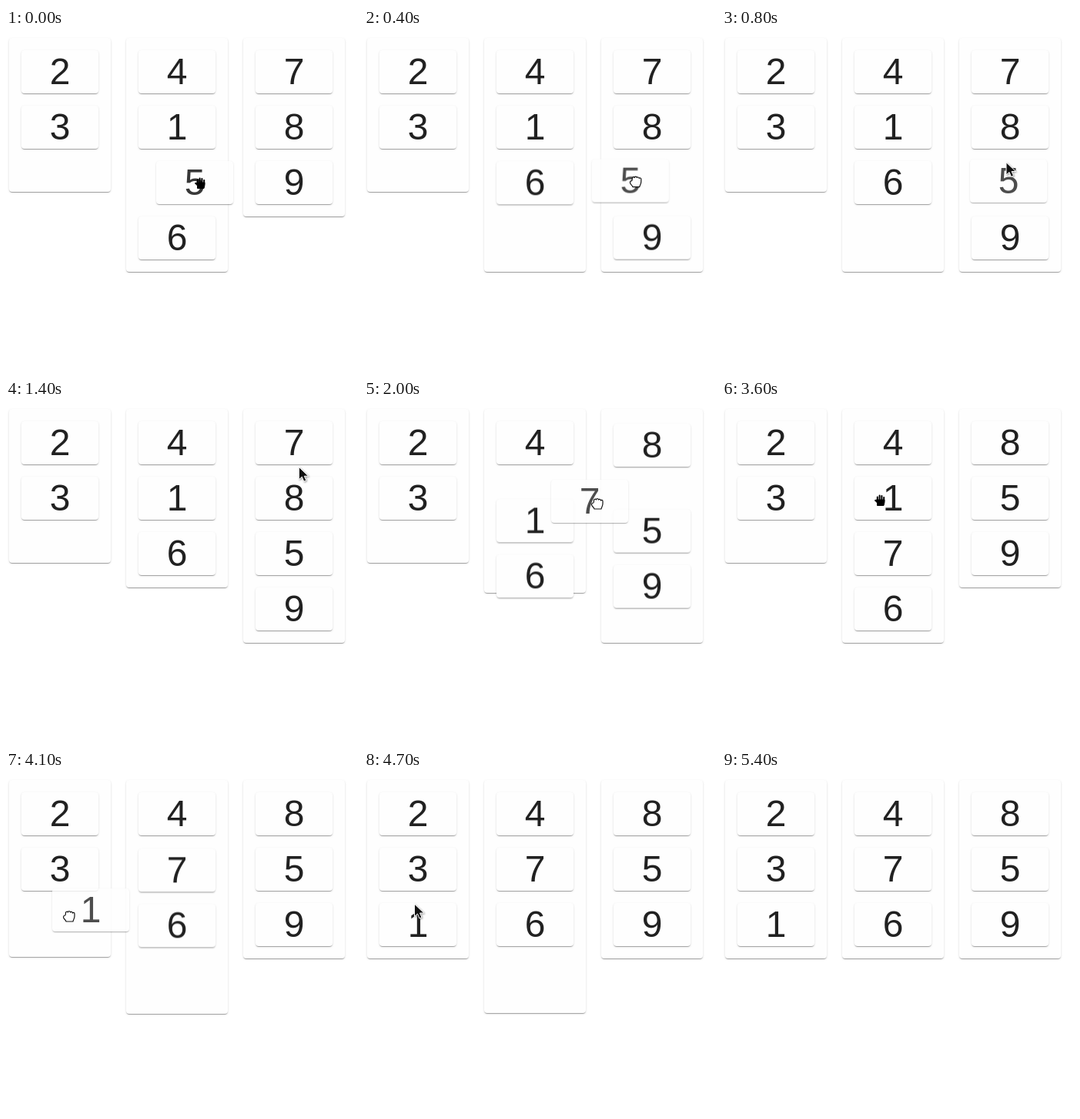
An HTML page that plays this animation: 457x446 px, repeating every 6000 ms.

```html
<!DOCTYPE html>
<html lang="en">
<head>
<meta charset="utf-8">
<style>
  html, body { margin: 0; width: 100%; height: 100%; overflow: hidden; background: #fff; }
  div {
    position: absolute; left: 0; top: 0; border-radius: 4px; background: #fefefe;
    box-shadow: 0 2px 1px -1px rgba(0,0,0,.2), 0 1px 1px rgba(0,0,0,.14), 0 1px 3px rgba(0,0,0,.12);
  }
  .column { top: 13px; width: 132px; }
  .card {
    width: 100px; height: 56px; text-align: center; color: #212121; will-change: transform;
    font: 48px/56px "Liberation Sans", Arial, sans-serif;
  }
  svg { position: absolute; left: 0; top: 0; overflow: visible; z-index: 2; }
  #arrow { filter: drop-shadow(1px 1px 1px #0006); }
</style>
</head>
<body>
<svg id="cursor" width="1" height="1" stroke-linejoin="round" stroke-linecap="round">
  <path id="arrow" d="M0 0V16L4 12.5L6.5 18.5L9.5 17L7 11.5H12Z" fill="#111" stroke="#fff"/>
  <g id="open" stroke="#000">
    <path d="M-3.2-4.5V1M-.4-6.5V0M2.4-6V0M5.2-4V0" stroke-width="2"/>
    <path d="M-6.5 0L-3.5 3V6.5H5L6 2V-1H-4Z"/>
  </g>
  <path id="fist" d="M-5-1C-8-1-8 2-6 4C-5 5-4 6-4 7H5C5 5 7 4 7 0V-3C7-5 5-5 4.5-4C4-6 2-6 1.5-5C1-7-1-7-1.5-5C-2-6.5-5-6-4.5-3.5Z" fill="#fff" stroke="#111" stroke-width="1.2"/>
</svg>
<script>
const LOOP = 6000, STEP = 100, SETTLE = 300;
const clamp = u => Math.min(1, Math.max(0, u));
const mix = (a, b, u) => a + (b - a) * u;
const easeOut = u => 1 - (1 - u) ** 3;
const smooth = u => u * u * (3 - 2 * u);

const slotX = column => 20 + 152 * column;
const slotY = slot => 29 + 72 * slot;
const columnHeight = count => Math.max(200, 16 + 72 * count);

const lists = [[2, 3], [4, 1, 5, 6], [7, 8, 9]];

// stops: the slots a dragged card claims on its way, as [time, column, slot]
const drags = [
  { label: 5, from: 0, to: 700, grip: [57, 29], stops: [[150, 2, 2]] },
  { label: 7, from: 1800, to: 2700, grip: [60, 31], stops: [[1805, 2, 1], [1952, 1, 1], [2150, 1, 2]] },
  { label: 1, from: 3800, to: 4400, grip: [22, 36], stops: [[3880, 0, 2]] },
];

// pointer path: time, x, y
const path = [
  [0, 252, 202], [500, 378, 199], [600, 378, 199], [800, 369, 175], [1600, 384, 60],
  [1700, 384, 60], [2000, 303, 136], [2400, 231, 205], [2600, 231, 205], [3000, 52, 130],
  [3300, 173, 107], [3600, 205, 132], [3700, 205, 132], [4100, 82, 190], [4200, 46, 209],
  [4300, 46, 209], [5100, 85, 140], [5300, 150, 26], [LOOP, 150, 26],
];

function addDiv(className, x, text = "") {
  const el = document.createElement("div");
  el.className = className;
  el.style.left = x + "px";
  el.textContent = text;
  return document.body.appendChild(el);
}

// A track is a start value and its later changes.
const track = value => ({ value, last: value, changes: [] });
function change(track, time, value) {
  if (track.last !== value) track.changes.push([time, track.last = value]);
}
const valueAt = (track, t, ease, duration) => track.changes.reduce(
  (v, [start, next]) => mix(v, next, ease(clamp((t - start) / duration))), track.value);

const columns = lists.map((list, i) => ({
  el: addDiv("column", slotX(i) - 16), height: track(columnHeight(list.length)),
}));
const cards = {};
lists.forEach((list, column) => list.forEach((label, slot) => {
  cards[label] = { el: addDiv("card", 0, label), x: slotX(column), y: track(slotY(slot)) };
}));

// Play the drags through the lists: columns grow on entry and shrink after the drop.
for (const drag of drags) {
  cards[drag.label].drag = drag;
  for (const [time, column, slot] of drag.stops) {
    const old = lists.find(list => list.includes(drag.label));
    old.splice(old.indexOf(drag.label), 1);
    lists[column].splice(slot, 0, drag.label);
    for (const list of lists) list.forEach((label, i) => change(cards[label].y, time, slotY(i)));
    const { height } = columns[column];
    change(height, time, Math.max(height.last, columnHeight(lists[column].length)));
    drag.x = slotX(column);
    drag.y = slotY(slot);
  }
  columns.forEach((c, i) => change(c.height, drag.to + 280, columnHeight(lists[i].length)));
}

function pointerAt(t) {
  const i = path.findIndex(k => k[0] > t);
  const [a, b] = [path[i - 1], path[i]], u = (t - a[0]) / (b[0] - a[0]);
  return [mix(a[1], b[1], u), mix(a[2], b[2], u)];
}

function pointerShape(t) {
  if (t >= 5400) return "";
  if (drags.some(d => t < d.from ? t >= d.from - 300 : t < 100)) return "open";
  return drags.some(d => t >= d.from && t < d.to) ? "fist" : "arrow";
}

function cardPose({ x, y, drag }, t) {
  const slot = valueAt(y, t, easeOut, SETTLE);
  if (!drag || t < drag.from) return [x, slot, 1];
  if (t >= drag.to + SETTLE) return [drag.x, slot, 1];
  const [px, py] = pointerAt(Math.min(t, drag.to - STEP));
  const home = clamp((t - drag.to) / SETTLE);
  const opacity = 1 - .2 * clamp((t - drag.from + 100) / 200);
  return [mix(px - drag.grip[0], drag.x, home), mix(py - drag.grip[1], drag.y, home), opacity];
}

const place = (el, x, y) => el.style.transform = `translate(${x}px,${y}px)`;
const cursor = document.getElementById("cursor");

function draw(now) {
  const t = Math.floor(now % LOOP / STEP) * STEP;
  for (const c of columns) c.el.style.height = Math.round(valueAt(c.height, t, smooth, 256)) + "px";
  for (const c of Object.values(cards)) {
    const [x, y, opacity] = cardPose(c, t);
    place(c.el, x, y);
    c.el.style.opacity = opacity;
    c.el.style.zIndex = opacity < 1 ? 1 : 0;
  }
  place(cursor, ...pointerAt(t));
  const shape = pointerShape(t);
  for (const el of cursor.children) el.style.display = el.id === shape ? "" : "none";
}

const begin = performance.now();
function tick() {
  draw(performance.now() - begin);
  requestAnimationFrame(tick);
}
tick();
</script>
</body>
</html>
```
